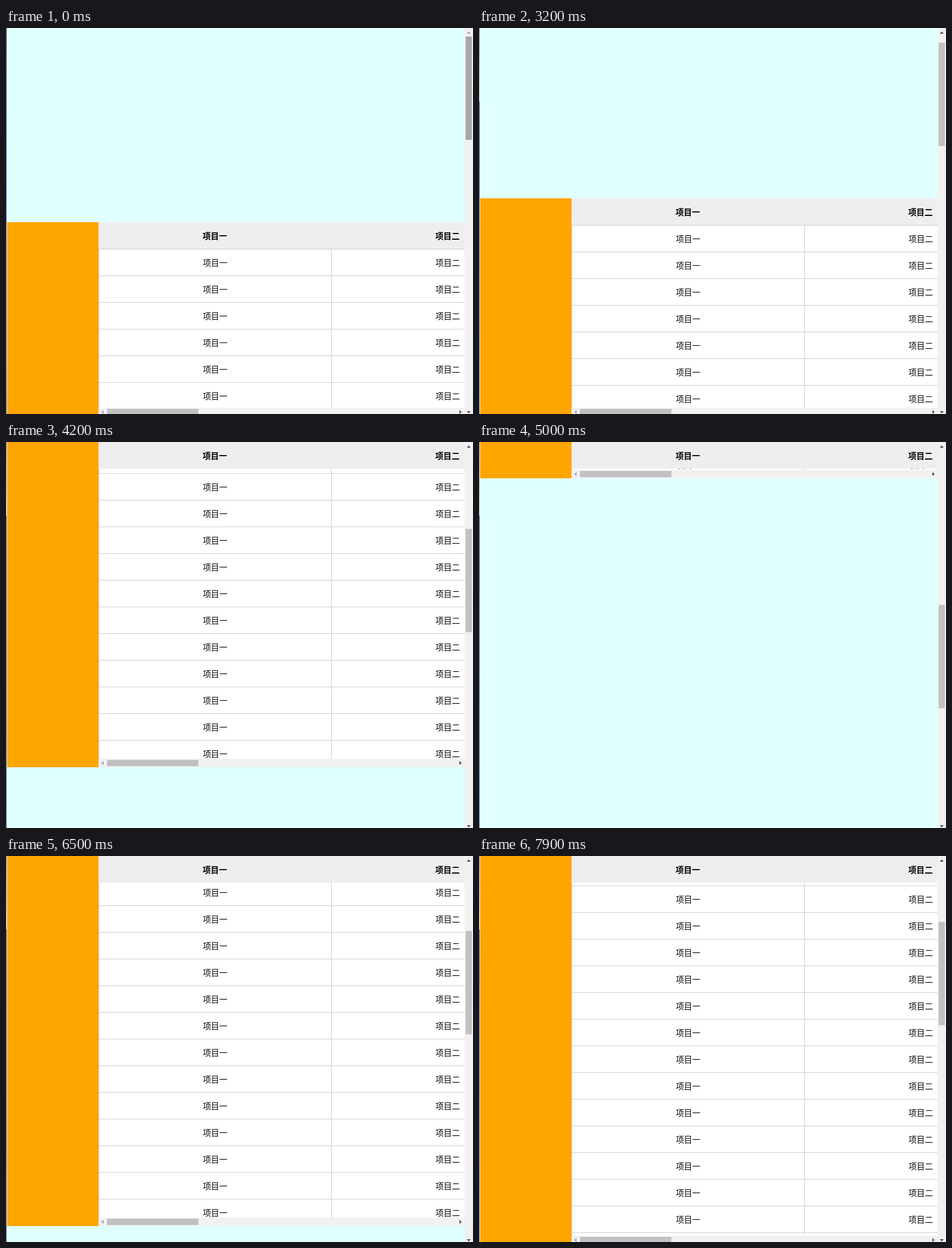
An HTML page for the animation above (8000 ms loop, 823x680 px).

```html
<!DOCTYPE html>
<html lang="zh-CN">
<head>
<meta charset="utf-8">
<style>
html, body { margin: 0; width: 100%; height: 100%; overflow: hidden; background: #fff; }
body { position: relative; font: 14.4px/47px "Noto Sans CJK SC", "Noto Sans CJK", sans-serif; color: #000; }
div, svg { position: absolute; }
#edge { left: 0; top: 0; width: 1px; height: 680px; background: linear-gradient(#0c2750, #1a5cae 50%, #1a4f86); }
#edge.lit { background: linear-gradient(#46566c, #a9b0ba 129px, #0b2c5e 130px, #1c5c94); }
#page { left: 2px; top: 0; width: 806px; height: 680px; overflow: hidden; background: #e0ffff; }
#table { left: 0; top: 0; width: 806px; height: 753px; background: #fff; }
#side { left: 0; top: 0; width: 161px; height: 753px; background: orange; }
.row { left: 161px; width: 822px; height: 47px; }
.cell { top: 0; width: 410px; height: 47px; box-sizing: border-box; text-align: center; }
.row .cell { border: solid #ccc; border-width: 1px 0 0 1px; line-height: 46px; }
#head { left: 161px; top: 0; width: 645px; height: 47px; overflow: hidden; background: #eee; font-weight: 700; }
#hbar { left: 161px; top: 0; width: 645px; height: 15px; background: #f1f1f1; }
#hthumb { left: 15px; top: 2px; width: 161px; height: 11px; background: #c1c1c1; }
#vbar { left: 808px; top: 0; width: 15px; height: 680px; overflow: hidden; background: #f1f1f1; }
#vthumb { left: 2px; top: 0; width: 11px; height: 182px; background: #c1c1c1; }
svg { left: 0; top: 0; overflow: visible; fill: #505050; }
</style>
</head>
<body>
<div id="edge"></div>
<div id="page">
  <div id="table"><div id="side"></div></div>
  <div id="hbar">
    <svg width="645" height="15"><path d="M9 4v7l-4-3.5z" fill="#a3a3a3"/><path d="M636 4v7l4-3.5z"/></svg>
    <div id="hthumb"></div>
  </div>
  <div id="head"></div>
</div>
<div id="vbar">
  <svg width="15" height="680"><path id="up" d="M4 10h7l-3.500-4z"/><path d="M4 675h7l-3.500 4z"/></svg>
  <div id="vthumb"></div>
</div>
<script>
const $ = id => document.getElementById(id);
const TOP = 342, BOTTOM = 1095, ROW = 47, VIEW = 684, BAR = 15;
const LOOP = 8000, STEP = 100, THUMB_RATIO = 3.78;

// Scroll offset at key times: [ms, px]
const keys = [
  [0, 0], [3100, 0], [3600, 209], [3900, 425], [4000, 455], [4300, 555], [4400, 569],
  [4500, 569], [5000, 1031], [5200, 1122], [5300, 1138], [5600, 1138], [6100, 681],
  [6400, 465], [6500, 443], [6700, 443], [7100, 120], [7300, 102], [7400, 102], [7900, 384]
];

function addCells(parent) {
  ['项目一', '项目二'].forEach((text, i) => {
    const cell = document.createElement('div');
    cell.className = 'cell';
    cell.style.left = i * 410 + 'px';
    cell.textContent = text;
    parent.append(cell);
  });
}

addCells($('head'));
for (let i = 1; i <= 15; i++) {
  const row = document.createElement('div');
  row.className = 'row';
  row.style.top = i * ROW + 'px';
  addCells(row);
  $('table').append(row);
}

function scrollAt(t) {
  const i = keys.findIndex(k => k[0] > t);
  if (i < 0) return keys[keys.length - 1][1];
  const [t0, s0] = keys[i - 1], [t1, s1] = keys[i];
  return Math.round(s0 + (s1 - s0) * (t - t0) / (t1 - t0));
}

const moveY = (id, y) => { $(id).style.transform = `translateY(${y}px)`; };
const grip = active => active ? '#a8a8a8' : '#c1c1c1';

function draw(now) {
  const t = Math.floor(now % LOOP / STEP) * STEP;
  const s = scrollAt(t), bottom = BOTTOM - s;
  moveY('table', TOP - s);
  moveY('head', Math.min(Math.max(TOP - s, 0), bottom - ROW));
  moveY('hbar', Math.min(VIEW, bottom) - BAR);
  moveY('vthumb', BAR + Math.floor(s / THUMB_RATIO));
  $('vthumb').style.background = grip(t < 100);
  $('hthumb').style.background = grip(t >= 1000 && t < 1500);
  $('up').style.fill = s ? '#505050' : '#a3a3a3';
  $('edge').className = t >= 2700 ? 'lit' : '';
}

const start = performance.now();
function tick() {
  draw(performance.now() - start);
  requestAnimationFrame(tick);
}
tick();
</script>
</body>
</html>
```
